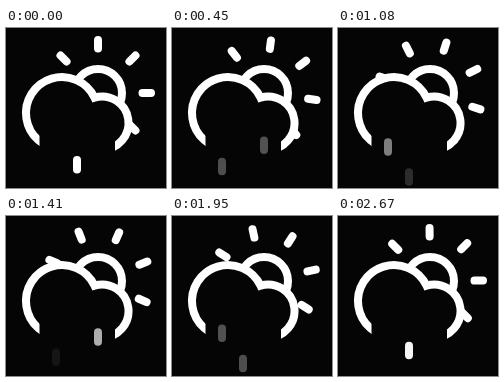
Write an HTML page that moves like this. It is 160 px wide and 160 px high and loops after 2.7 s.

```html
<!DOCTYPE html>
<html lang="en">
<head>
<meta charset="utf-8">
<title>Sun, cloud and drizzle</title>
<style>
  html, body { margin: 0; height: 100%; overflow: hidden; background: #050505; }
  svg { display: block; width: 100vw; height: 100vh; }
</style>
</head>
<body>
<svg viewBox="0 0 160 160" fill="#050505" stroke="#fff" stroke-width="8">
  <g id="rays" stroke-linecap="round"></g>
  <circle cx="92" cy="65" r="24"/>
  <path d="M56 121A36 36 0 1 1 88.53 69.58A26.5 26.5 0 1 1 96 121.5Z"/>
  <path d="M33.5 100H109V160H33.5Z" stroke="none"/>
  <g id="drops" stroke-linecap="round"></g>
</svg>
<script>
const LOOP = 2700, CYCLE = 900, FALL = 600;
const rays = document.getElementById('rays');
const dropLayer = document.getElementById('drops');

function addLine(parent, x, y1, y2) {
  const line = document.createElementNS('http://www.w3.org/2000/svg', 'line');
  const attributes = { x1: x, x2: x, y1, y2 };
  for (const name in attributes) line.setAttribute(name, attributes[name]);
  parent.append(line);
  return line;
}

for (let i = 0; i < 8; i++) {
  addLine(rays, 0, -53, -44.5).setAttribute('transform', `rotate(${i * 45})`);
}

const drops = [
  { x: 50, top: 108, delay: 0 },
  { x: 92, top: 108, delay: 300 },
  { x: 71, top: 117, delay: 600 }
].map(drop => ({ ...drop, line: addLine(dropLayer, drop.x, drop.top, drop.top + 9.5) }));

function draw(now) {
  const time = now % LOOP;
  rays.setAttribute('transform', `translate(92 65) rotate(${time / LOOP * 45})`);
  for (const { line, delay } of drops) {
    const phase = (time - delay + CYCLE) % CYCLE;
    const progress = Math.min(phase / FALL, 1);
    const fall = 15 * (1 - Math.cos(Math.PI * progress));
    line.setAttribute('transform', `translate(0 ${fall})`);
    line.setAttribute('opacity', progress < 1 ? Math.sin(Math.PI * progress) ** 3.5 : 0);
  }
}

const start = performance.now();
function tick() {
  draw(performance.now() - start);
  requestAnimationFrame(tick);
}
tick();
</script>
</body>
</html>
```
